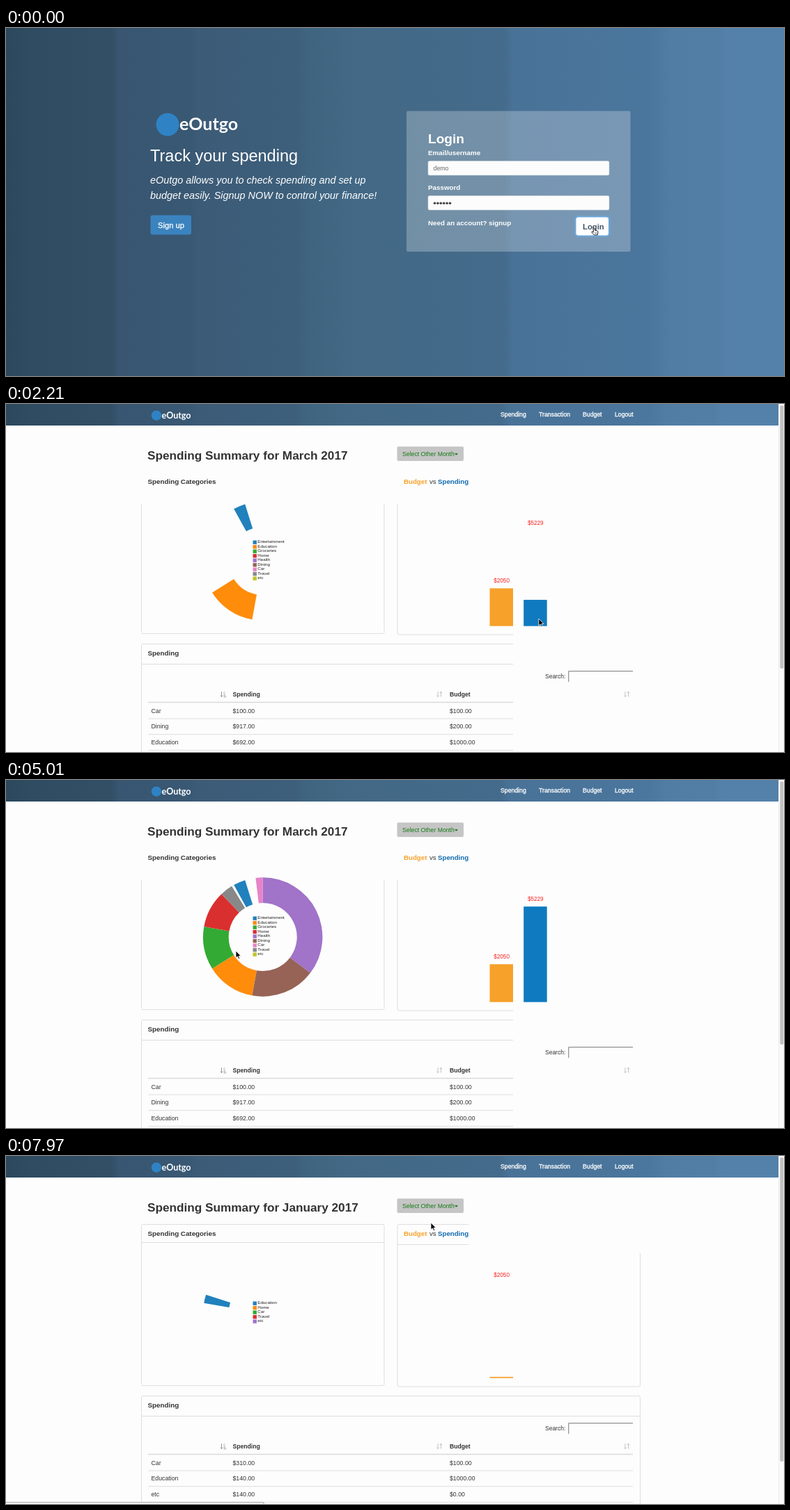
An HTML page for the animation above (8 s loop, 1117 by 501 pixels).

```html
<!DOCTYPE html>
<html lang="en">
<head>
<meta charset="utf-8">
<title>Spending tracker</title>
<style>
  html, body { margin: 0; width: 100%; height: 100%; overflow: hidden; background: #fdfdfd; }
  svg { display: block; width: 1117px; height: 501px; font-family: "Liberation Sans", Arial, sans-serif; }
  text { white-space: pre; }
  .b { font-weight: bold; }
  .i { font-style: italic; }
  .brand { font-family: Lato, sans-serif; font-weight: bold; }
  .firm { stroke: #fff; stroke-width: .3px; }
</style>
</head>
<body>
<svg id="stage" viewBox="0 0 1117 501" xmlns="http://www.w3.org/2000/svg"></svg>
<script>
const LOOP = 8000, LOADED = 1170, TICK = 147.5;
const OPEN = 6340, RELOAD = 7820;
const INK = '#333', EDGE = '#dedede', ORANGE = '#f7a12b', BLUE = '#0f7ac0';
const COLORS = ['#2081bd', '#ff8c0b', '#33aa33', '#da2f2f', '#a173c9', '#966356', '#e783c9', '#888888', '#c3c422'];

// Markup helpers
const text = (x, y, size, fill, str, cls = '') =>
  `<text x="${x}" y="${y}" font-size="${size}" fill="${fill}" class="${cls}">${str}</text>`;
const box = (x, y, w, h, fill, more = '') =>
  `<rect x="${x}" y="${y}" width="${w}" height="${h}" fill="${fill}" ${more}/>`;
const rule = (x1, x2, y, w = 1, color = EDGE) =>
  `<path d="M${x1} ${y}H${x2}" stroke="${color}" stroke-width="${w}"/>`;
const frame = (x, y, w, h, head) =>
  box(x, y, w, h, 'none', `stroke="${EDGE}" rx="2"`) + rule(x, x + w, head);
const group = (id, body, more = '') => `<g id="${id}" ${more}>${body}</g>`;

const stops = [[0, '#2b485d'], [40, '#2f4c62'], [153, '#324f66'], [162, '#385671'], [265, '#395873'],
  [275, '#3c5b77'], [418, '#3d5f7b'], [430, '#3f6480'], [490, '#426885'], [715, '#446b8b'],
  [728, '#497297'], [930, '#4b769d'], [955, '#517da4'], [1025, '#527ea6'], [1035, '#5481aa'], [1117, '#5481aa']];

const defs = `<defs>
  <linearGradient id="sky">${stops.map(([x, c]) => `<stop offset="${x / 1117}" stop-color="${c}"/>`).join('')}</linearGradient>
  <filter id="glow" x="-20%" y="-30%" width="140%" height="160%"><feGaussianBlur stdDeviation="1.3"/></filter>
  <clipPath id="shown"><path id="shownPath"/></clipPath></defs>`;

const login =
  box(0, 0, 1117, 501, 'url(#sky)') +
  '<circle cx="232" cy="139" r="16.5" fill="#2f83c4"/>' +
  text(249, 147, 25, '#fff', 'eOutgo', 'brand') +
  text(207, 192, 23.5, '#fff', 'Track your spending') +
  text(207, 223.5, 14.4, '#fff', 'eOutgo allows you to check spending and set up', 'i') +
  text(207, 245.5, 14.4, '#fff', 'budget easily. Signup NOW to control your finance!', 'i') +
  box(207.5, 269.5, 58.5, 28, '#3a83bf', 'rx="3"') +
  text(218, 287.5, 11.2, '#fff', 'Sign up', 'firm') +
  box(575, 119.5, 321.5, 202.5, '#fff', 'rx="2" fill-opacity=".25"') +
  text(606, 165.8, 19.1, '#fff', 'Login', 'b') +
  text(606, 183.3, 9.8, '#fff', 'Email/username', 'b') +
  text(606, 233.3, 9.8, '#fff', 'Password', 'b') +
  text(606, 283.5, 9.8, '#fff', 'Need an account? signup', 'b') +
  [191.5, 241.5].map(y => box(606, y, 260, 20.5, '#fcfcfc', 'rx="2" stroke="#c8d2da" stroke-width=".6"')).join('') +
  text(613.5, 205, 8.8, '#666', 'demo') +
  [0, 1, 2, 3, 4, 5].map(i => `<circle cx="${615.5 + i * 4.4}" cy="252.3" r="1.75" fill="#444"/>`).join('') +
  box(817, 271, 49.5, 29, '#66afe9', 'rx="4" filter="url(#glow)"') +
  box(818.5, 272.5, 46.5, 26, '#fff', 'rx="3"') +
  text(828, 289.6, 11.3, '#3f5468', 'Login', 'b');

const nav = (dx, w) => box(0, 0, w, 31, 'url(#sky)') + `<g transform="translate(${dx})">
  <circle cx="216" cy="16.5" r="7.2" fill="#2f83c4"/>` +
  text(223.5, 20.6, 12.5, '#fff', 'eOutgo', 'brand') +
  [[710, 'Spending'], [765, 'Transaction'], [828, 'Budget'], [874, 'Logout']]
    .map(([x, s]) => text(x, 18.4, 8.7, '#fff', s, 'firm')).join('') + '</g>';

const monthButton = (x, id) => box(x, 61.3, 95.5, 20.7, '#c5c5c5', 'rx="2"') +
  `<g id="${id}" fill="#157a15">` + text(x + 7.5, 74.8, 8.7, 'inherit', 'Select Other Month') +
  `<path d="M${x + 82.5} 71h5l-2.5 2.7z"/></g>`;
const versus = (x, y) => text(x, y, 9.7, ORANGE, 'Budget', 'b') +
  text(x + 37, y, 9.7, INK, 'vs') + text(x + 49, y, 9.7, '#1069ad', 'Spending', 'b');

const empty = nav(4.5, 1117) +
  monthButton(566, 'emptyLabel') +
  frame(198.5, 82.5, 348.5, 45, 108.5) + frame(566.5, 82.5, 348, 77.5, 111.5) + frame(198.5, 173.5, 716, 83.5, 202.5) +
  text(208, 99.3, 9.8, INK, 'Spending Categories', 'b') + versus(575.5, 99.3) +
  text(208, 190, 9.8, INK, 'Spending', 'b') +
  text(282, 226, 8.6, INK, 'Spending', 'b') + text(627, 226, 8.6, INK, 'Budget', 'b') +
  rule(208, 905, 234.5, 1.2, '#d4d4d4');

const arrow = (x, up) => up
  ? `M${x} 421.5V414m-1.7 2l1.7-2l1.7 2`
  : `M${x} 414v7.5m-1.7-2l1.7 2l1.7-2`;
const sorter = x => `<path d="${arrow(x + 2, false)}${arrow(x + 6.5, true)}" fill="none" stroke="#c4c4c4"/>`;

const report = nav(0, 1109) +
  box(1109, 0, 8, 501, '#fafafa') + box(1109, 0, .7, 501, '#e6e6e6') +
  box(1111.3, 2, 5, 379, '#c1c1c1', 'rx="2.5" id="thumb"') +
  text(203, 79.6, 17.2, INK, '', 'b').replace('<text', '<text id="title"') +
  group('frames',
    frame(194.5, 98.5, 348.5, 232, 124.5) + frame(562, 98.5, 348.5, 233.5, 127.5) +
    frame(194.5, 345.5, 716, 200, 374.5) + rule(204, 900, 429.5, 1.6, '#d9d9d9') +
    [453, 475.7, 498.3].map(y => rule(204, 900, y)).join(''), 'clip-path="url(#shown)"') +
  box(561, 60.5, 96.5, 22.3, '#66afe9', 'rx="3" filter="url(#glow)" id="ring"') +
  monthButton(561.5, 'label') +
  text(203.5, 115, 9.8, INK, 'Spending Categories', 'b') + versus(571, 115) +
  text(203.5, 362, 9.8, INK, 'Spending', 'b') +
  text(774, 395, 8.5, INK, 'Search:') + '<path d="M807.8 400V384.7H900" fill="none" stroke="#777"/>' +
  text(325.5, 421, 8.6, INK, 'Spending', 'b') + text(637, 421, 8.6, INK, 'Budget', 'b') +
  `<path d="${arrow(309.5, false)}M312.5 415h1.5m-1.5 2.2h2m-2 2.2h2.8m-2.8 2.2h3.6" fill="none" stroke="#999"/>` +
  sorter(618) + sorter(887) +
  group('rows', '') + group('legend', '') + group('pie', '') + group('bars', '');

const menu = box(562, 83.5, 100, 56, '#fff', 'rx="2.5" stroke="#ccc" stroke-width=".7"') +
  box(562.4, 87, 99.2, 16.5, '#f0f0f0', 'id="hover"') +
  ['January 2017', 'February 2017', 'March 2017']
    .map((s, i) => text(574, 98.3 + i * 16.5, 8.7, INK, s)).join('');

const status = box(-2, 498.5, 372, 6, '#f3f3f3', 'stroke="#a8a8a8" rx="1"');
const arrowCursor = '<path d="M0 0V10.2L2.4 8L4 11.6L5.6 10.9L4.1 7.4H7.2Z" fill="#000" stroke="#fff" stroke-width=".8"/>';
const handCursor = '<path d="M-1 0Q.2-1 1 .2L1.4 3.2L4.8 4Q6.2 4.4 6 6L5.2 10H.2L-3 6.2Q-3.3 4.8-1.9 5L-.5 6.2Z" fill="#fff" stroke="#111" stroke-width=".9"/>' +
  '<path d="M2 6.2v2.4M3.8 6.2v2.4" stroke="#111" stroke-width=".6"/>';

const stage = document.getElementById('stage');
stage.innerHTML = defs + group('login', login) + group('empty', empty) + group('report', report) +
  group('menu', menu) + group('status', status) + group('cursor', group('arrow', arrowCursor) + group('hand', handCursor));
const el = id => document.getElementById(id);
const show = (id, on) => el(id).setAttribute('display', on ? 'inline' : 'none');

// Arcs: start and end angle in degrees, clockwise from the top, in legend order
const months = {
  march: {
    title: 'Spending Summary for March 2017', thumb: 379, pieStart: 1215, barStart: 1293,
    names: ['Entertainment', 'Education', 'Groceries', 'Home', 'Health', 'Dining', 'Car', 'Travel', 'etc'],
    arcs: [[331, 342.7], [190.3, 238], [238, 280], [280, 316.2], [0, 127.2], [127.2, 190.3], [353.1, 360], [316.2, 331], [342.7, 353.1]],
    bars: [[2050, 54.5], [5229, 137.5]],
    rows: [['Car', '$100.00', '$100.00'], ['Dining', '$917.00', '$200.00'], ['Education', '$692.00', '$1000.00']]
  },
  january: {
    title: 'Spending Summary for January 2017', thumb: 438, pieStart: 7770, barStart: 7807,
    names: ['Education', 'Home', 'Car', 'Travel', 'etc'],
    arcs: [[279.5, 319.7]],
    bars: [[2050, 137.5]],
    rows: [['Car', '$310.00', '$100.00'], ['Education', '$140.00', '$1000.00'], ['etc', '$140.00', '$0.00']]
  }
};

const ease = p => {
  p = Math.min(1, Math.max(0, p));
  return p < .5 ? 4 * p ** 3 : 1 - 4 * (1 - p) ** 3;
};

function sector(from, to, fill) {
  const at = (deg, r) => {
    const a = deg * Math.PI / 180;
    return `${(368.7 + r * Math.sin(a)).toFixed(2)} ${(226 - r * Math.cos(a)).toFixed(2)}`;
  };
  const R = 85.7, r = 49;
  return `<path d="M${at(from, R)}A${R} ${R} 0 0 1 ${at(to, R)}L${at(to, r)}A${r} ${r} 0 0 0 ${at(from, r)}Z" fill="${fill}"/>`;
}

function pie(m, t) {
  return m.arcs.map(([a, b], i) => {
    const p = ease((t - m.pieStart - i * 495) / 495);
    return p > .004 ? sector(a, a + (b - a) * p, COLORS[i]) : '';
  }).join('');
}

function bars(m, t) {
  return m.bars.map(([sum, full], i) => {
    const start = m.barStart + i * 500;
    if (t < start) return '';
    const h = full * ease((t - start) / 1000), x = 694.5 + i * 48.7;
    return box(x, 319.7 - h, 33.5, h, [ORANGE, BLUE][i]) +
      text(x + 5.7, 319.7 - full - 8.7, 8.2, '#f22', '$' + sum);
  }).join('');
}

const legend = m => m.names.map((s, i) => {
  const y = 225.7 - m.names.length * 3.25 + i * 6.5;
  return box(354.5, y, 5.4, 5.4, COLORS[i]) + text(361.3, y + 3.7, 6.2, '#222', s);
}).join('');

const rows = m => m.rows.map((r, n) =>
  r.map((s, i) => text([208.5, 325.5, 637][i], 444.6 + n * 22.8, 8.75, INK, s)).join('')).join('');

// Parts of the panel outlines that are painted at each stage
const early = 'M190 144H546V340H190ZM560 144H728V340H560ZM190 344H728V501H190Z';
const late = early + 'M344 97H649V144H344Z';
const full = 'M190 97H664V140H190ZM190 140H915V501H190Z';

const path = [[0, 844, 288], [1169, 844, 288], [1170, 833, 318], [2202, 765, 309], [2650, 600, 300], [3235, 291, 278],
  [3390, 205, 285], [3900, 141, 315], [4700, 143, 316], [5005, 330, 246], [5740, 617, 80], [6340, 617, 80], [6780, 610, 96], [8000, 610, 96]];

function pointer(t) {
  const k = Math.max(1, path.findIndex(p => p[0] >= t));
  const [t0, x0, y0] = path[k - 1], [t1, x1, y1] = path[k];
  const p = (t - t0) / (t1 - t0);
  return [x0 + (x1 - x0) * p, y0 + (y1 - y0) * p];
}

let current;
function setMonth(m) {
  if (m === current) return;
  current = m;
  el('title').textContent = m.title;
  el('thumb').setAttribute('height', m.thumb);
  el('legend').innerHTML = legend(m);
  el('rows').innerHTML = rows(m);
}

function draw(time) {
  const t = time < LOADED ? time : LOADED + Math.floor((time - LOADED) / TICK) * TICK;
  const ready = t > LOADED, again = t >= RELOAD - 20;
  const m = again ? months.january : months.march;
  show('login', t < LOADED);
  show('empty', t === LOADED);
  show('report', ready);
  if (ready) {
    setMonth(m);
    el('pie').innerHTML = pie(m, t);
    el('bars').innerHTML = bars(m, t);
    el('shownPath').setAttribute('d', again ? full : t < 5580 ? early : late);
  }
  const focused = t >= 6030 && !again;
  show('ring', focused);
  el('label').setAttribute('fill', focused && t < 7500 ? '#333' : '#157a15');
  show('menu', t >= OPEN - 20 && !again);
  show('hover', t >= 6470 && t < 7500);
  show('status', time >= 150 && t <= LOADED || t >= 6610);
  const [x, y] = pointer(t);
  el('cursor').setAttribute('transform', `translate(${x.toFixed(1)} ${y.toFixed(1)})`);
  const hand = t < LOADED || t >= 5730 && t < 7500;
  show('hand', hand);
  show('arrow', !hand);
}

const begin = performance.now();
function tick() {
  draw((performance.now() - begin) % LOOP);
  requestAnimationFrame(tick);
}
tick();
</script>
</body>
</html>
```
